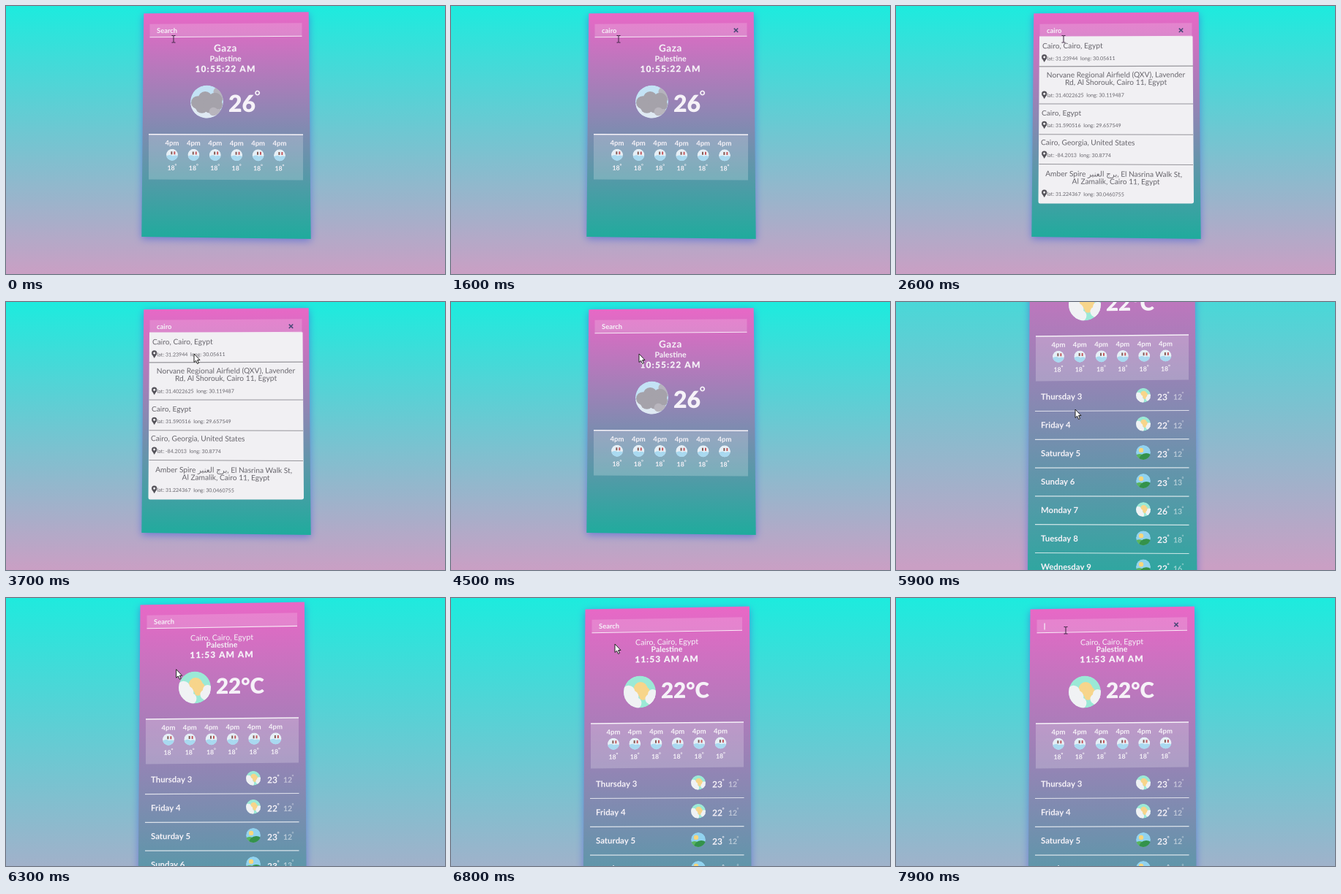
Recreate the animation shown at these times as an HTML page with a canvas. Size 600 by 367 pixels, loop 8000 ms.

```html
<!DOCTYPE html>
<html lang="en">
<head>
<meta charset="utf-8">
<title>Weather card</title>
<style>
  html, body { margin: 0; width: 100%; height: 100%; overflow: hidden; }
  canvas { display: block; width: 600px; height: 367px; }
</style>
</head>
<body>
<canvas id="stage" width="600" height="367"></canvas>
<script>
const ctx = document.getElementById('stage').getContext('2d');
const W = 600, H = 367, LOOP = 8000;
const FONT = 'Lato, "Noto Sans", "DejaVu Sans", sans-serif';
const WHITE = '#f6f2f8', GREY = '#67656c';

// Each card: corners, tilt of horizontal lines at top and bottom, page height.
const SHORT = { cx: 301, top: 9.3, bottom: 317.5, halfTop: 112.7, halfBottom: 115.7, k0: -.009, k1: .012, page: 367 };
const LONG = { cx: 295.7, top: 13.6, bottom: 533, halfTop: 112.2, halfBottom: 116, k0: -.018, k1: .008, page: 488 };

const ROWS = [
  ['Thursday 3', 0, 23, 12], ['Friday 4', 0, 22, 12], ['Saturday 5', 1, 23, 12], ['Sunday 6', 1, 23, 13],
  ['Monday 7', 0, 26, 13], ['Tuesday 8', 1, 23, 18], ['Wednesday 9', 1, 22, 16]
];
const RESULTS = [
  { y: 54, x: 200, lines: ['Cairo, Cairo, Egypt'], pos: ['31.23944', '30.05611'], end: 82.5 },
  { y: 94, lines: ['Norvane Regional Airfield (QXV), Lavender', 'Rd, Al Shorouk, Cairo 11, Egypt'], pos: ['31.4022625', '30.119487'], end: 134 },
  { y: 146, x: 199, lines: ['Cairo, Egypt'], pos: ['31.590516', '29.657549'], end: 176 },
  { y: 187, x: 198, lines: ['Cairo, Georgia, United States'], pos: ['-84.2013', '30.8774'], end: 217 },
  { y: 230, lines: ['Amber Spire برج العنبر, El Nasrina Walk St,', 'Al Zamalik, Cairo 11, Egypt'], pos: ['31.224367', '30.0460755'] }
];
// time, x, y of the pointer tip
const POINTER = [[0, 229, 45], [2700, 229, 45], [3300, 257, 71], [5400, 257, 71], [5850, 245, 147],
  [6050, 245, 147], [6500, 224, 63], [6900, 224, 63], [7250, 232, 44], [8000, 232, 44]];

let card, scroll;

const clamp = v => Math.max(0, Math.min(1, v));
const ease = v => (v = clamp(v), v * v * (3 - 2 * v));

// Tilts whatever is drawn next as the card tilts at height y.
function tilt(y) {
  const k = card.k0 + (card.k1 - card.k0) * (y - card.top) / (card.bottom - card.top);
  ctx.setTransform(1, k, 0, 1, 0, -scroll - k * card.cx);
}

// y is the middle of the capitals
function text(s, x, y, size, { weight = 700, color = WHITE, align = 'left', spacing = 0 } = {}) {
  tilt(y);
  ctx.font = `${weight} ${size}px ${FONT}`;
  ctx.textAlign = align;
  ctx.letterSpacing = spacing + 'px';
  ctx.fillStyle = color;
  ctx.fillText(s, x, y + size * .36);
}

function box(x0, y0, x1, y1, color) {
  tilt((y0 + y1) / 2);
  ctx.fillStyle = color;
  ctx.fillRect(x0, y0, x1 - x0, y1 - y0);
}

function rule(x0, x1, y, color = WHITE, width = 1.3) {
  box(x0, y - width / 2, x1, y + width / 2, color);
}

function blobs(color, ...list) {
  ctx.fillStyle = color;
  for (const [x, y, r] of list) {
    ctx.beginPath();
    ctx.arc(x, y, r, 0, 7);
    ctx.fill();
  }
}

// Round picture; paint works in a circle of radius 10.
function badge(x, y, r, paint) {
  tilt(y);
  ctx.save();
  ctx.translate(x, y);
  ctx.scale(r / 10, r / 10);
  ctx.beginPath();
  ctx.arc(0, 0, 10, 0, 7);
  ctx.clip();
  paint();
  ctx.restore();
}

function cloudy() {
  blobs('#c3e2f5', [0, 0, 10]);
  blobs('#dfe9f3', [-8, 5, 4], [-4, 8, 4], [2, 9, 4]);
  blobs('#b5b3bd', [7, -6, 3], [9, -4, 3]);
  blobs('#a5a2aa', [-5.5, .5, 4], [-1, -2, 4.2], [5, -1, 4.4], [-3, 3, 4], [2, 2.5, 4.5], [6, 2, 3.5]);
  blobs('#b8b5bd', [4, 6, 2.6], [7, 6.4, 2]);
}

function sunny() {
  blobs('#9be9d6', [0, 0, 10]);
  blobs('#f7d58b', [.5, -1.8, 4.3], [2.6, .4, 3.8], [2, 3, 2.2]);
  blobs('#f0f2f4', [-7, 0, 4], [-4.5, 3, 3.8], [-2.5, 7, 3.6], [-7, 6, 4], [8, 1.5, 3], [6.6, 4.5, 3.2], [8, 6, 3]);
}

function hills() {
  blobs('#91d3ef', [0, 0, 10]);
  blobs('#f7d67c', [-3, -3, 3.2]);
  blobs('#58b45f', [-5, 11, 9]);
  blobs('#34924b', [4, 11, 10]);
}

function snowy() {
  blobs('#e6eff6', [0, 0, 10]);
  blobs('#a9d9f0', [-4, 9, 8.5], [5, 9, 8]);
  ctx.fillStyle = '#80564f';
  ctx.fillRect(-2, -5.5, 2.4, 5);
  ctx.fillStyle = '#c25358';
  ctx.fillRect(3, -5.5, 2.4, 5);
}

function background() {
  ctx.setTransform(1, 0, 0, 1, 0, -scroll);
  const g = ctx.createLinearGradient(0, 0, 0, card.page);
  g.addColorStop(0, '#1debde');
  g.addColorStop(1, '#ca9fc4');
  ctx.fillStyle = g;
  ctx.fillRect(0, 0, W, H + scroll);
}

function cardShape() {
  const { cx, top, bottom, halfTop, halfBottom, k0, k1 } = card;
  const g = ctx.createLinearGradient(0, top, 0, bottom);
  g.addColorStop(0, '#e868c6');
  g.addColorStop(1, '#20ab9d');
  ctx.save();
  ctx.shadowColor = 'rgba(70,90,215,.6)';
  ctx.shadowBlur = 11;
  ctx.shadowOffsetY = 3;
  ctx.fillStyle = g;
  ctx.beginPath();
  ctx.moveTo(cx - halfTop, top - k0 * halfTop);
  ctx.lineTo(cx + halfTop, top + k0 * halfTop);
  ctx.lineTo(cx + halfBottom, bottom + k1 * halfBottom);
  ctx.lineTo(cx - halfBottom, bottom - k1 * halfBottom);
  ctx.fill();
  ctx.restore();
}

function search(x, y, width, value, focused, caret) {
  box(x, y - 9, x + width, y + 8.5, 'rgba(255,255,255,.17)');
  rule(x, x + width, y + 9, 'rgba(255,255,255,.85)', 1.1);
  text(focused ? value : 'Search', x + 9.5, y, 9.4);
  if (!focused) return;
  if (caret) {
    const end = x + 10 + ctx.measureText(value).width;
    box(end, y - 4, end + 1.2, y + 5, WHITE);
  }
  tilt(y);
  ctx.strokeStyle = '#4b4a78';
  ctx.lineWidth = 1.6;
  const cx = x + width - 15;
  ctx.beginPath();
  ctx.moveTo(cx - 2.7, y - 1.8); ctx.lineTo(cx + 2.7, y + 3.6);
  ctx.moveTo(cx + 2.7, y - 1.8); ctx.lineTo(cx - 2.7, y + 3.6);
  ctx.stroke();
}

function hours(x0, x1, top, bottom, first, step) {
  box(x0, top, x1, bottom, 'rgba(255,255,255,.21)');
  rule(x0, x1, top, WHITE, 1.4);
  for (let i = 0; i < 6; i++) {
    const x = first + i * step;
    text('4pm', x, top + 11.7, 9.5, { align: 'center' });
    badge(x, top + 28, 8, snowy);
    text('18', x - 1.5, top + 46, 8.8, { align: 'center' });
    text('°', x + 3.5, top + 43, 7);
  }
}

function results() {
  tilt(156);
  ctx.fillStyle = '#f1f0f3';
  ctx.beginPath();
  ctx.moveTo(196, 41.5);
  ctx.lineTo(405.5, 41.5);
  ctx.lineTo(407, 268);
  ctx.quadraticCurveTo(407, 270.5, 404, 270.5);
  ctx.lineTo(197, 270.5);
  ctx.quadraticCurveTo(194.5, 270.5, 194.5, 268);
  ctx.fill();
  for (const { y, x, lines, pos, end } of RESULTS) {
    lines.forEach((s, i) => text(s, x || 300.5, y + i * 10.3, 10.2,
      { weight: 400, color: GREY, align: x ? 'left' : 'center' }));
    const below = y + (lines.length > 1 ? 28 : 17.5);
    text(`lat: ${pos[0]}  long: ${pos[1]}`, 206.7, below, 7.1, { weight: 400, color: GREY });
    blobs('#55535a', [202.7, below - 2, 3.6]);
    ctx.beginPath();
    ctx.moveTo(199.5, below - .5);
    ctx.lineTo(202.7, below + 5);
    ctx.lineTo(205.9, below - .5);
    ctx.fill();
    blobs('#f1f0f3', [202.7, below - 2, 1.5]);
    if (end) rule(195.5, 406, end, '#96959b', 1.1);
  }
}

function shortCard(t) {
  const mid = { align: 'center' };
  const focused = t >= 400 && t < 3800;
  const value = 'cairo'.slice(0, Math.max(0, Math.floor((t - 500) / 200)));
  search(196.5, 33, 208, value, focused, value.length < 5 && t % 1000 < 600);
  if (t >= 1700 && t < 3800) return results();
  text('Gaza', 300, 57.5, 13.5, { ...mid, spacing: .6 });
  text('Palestine', 300, 72, 10.6, mid);
  text('10:55:22 AM', 300, 86, 12, { ...mid, weight: 900, spacing: 1.1 });
  badge(274.5, 131, 22.5, cloudy);
  text('26', 304, 133.5, 32, { weight: 900 });
  text('°', 339.5, 123, 20);
  hours(195, 406, 176, 238, 227, 29.4);
}

function longCard(t) {
  const mid = { align: 'center' };
  search(192.5, 37, 205.5, '', t >= 7500, true);
  text('Cairo, Cairo, Egypt', 295, 60, 10.6, { ...mid, weight: 400 });
  text('Palestine', 295, 70, 10.5, mid);
  text('11:53 AM AM', 295, 83.5, 12, { ...mid, weight: 900, spacing: 1 });
  badge(258, 128, 22, sunny);
  text('22°C', 287, 126.5, 29.5, { weight: 900 });
  hours(191, 400, 171, 232.5, 222, 29.3);
  ROWS.forEach(([day, kind, high, low], i) => {
    const y = 254 + i * 39, dim = { color: 'rgba(255,255,255,.5)' };
    text(day, 198, y, 11.4);
    badge(338, y - 1, 10, kind ? hills : sunny);
    text(high, 357, y + 1.5, 12);
    text('°', 370.5, y - 3, 7.5);
    text(low, 379, y + 1.5, 10.4, dim);
    text('°', 390.5, y - 3, 7, dim);
    rule(190, 400.5, y + 20, 'rgba(255,255,255,.75)', 1.2);
  });
}

function pointer(t) {
  const i = POINTER.findIndex(p => p[0] > t), [t0, x0, y0] = POINTER[i - 1], [t1, x1, y1] = POINTER[i];
  const v = ease((t - t0) / (t1 - t0));
  ctx.setTransform(1, 0, 0, 1, x0 + (x1 - x0) * v, y0 + (y1 - y0) * v);
  ctx.lineWidth = 1;
  if (t < 2850 || t > 7150) {
    ctx.strokeStyle = '#3a2440';
    ctx.stroke(new Path2D('M-2.5 -4.5H-.8L0 -4L.8 -4.5H2.5M0 -4V4.5M-2.5 5H-.8L0 4.5L.8 5H2.5'));
    return;
  }
  const arrow = new Path2D('M0 0V11.5L2.6 9.2L4.5 13.5L6.5 12.6L4.6 8.5H8Z');
  ctx.fillStyle = '#fff';
  ctx.strokeStyle = '#222';
  ctx.fill(arrow);
  ctx.stroke(arrow);
}

function draw() {
  const t = performance.now() % LOOP;
  const loaded = t >= 4900;
  card = loaded ? LONG : SHORT;
  scroll = 125 * (ease((t - 5450) / 400) - ease((t - 5980) / 370));
  background();
  cardShape();
  (loaded ? longCard : shortCard)(t);
  pointer(t);
  requestAnimationFrame(draw);
}
draw();
</script>
</body>
</html>
```
